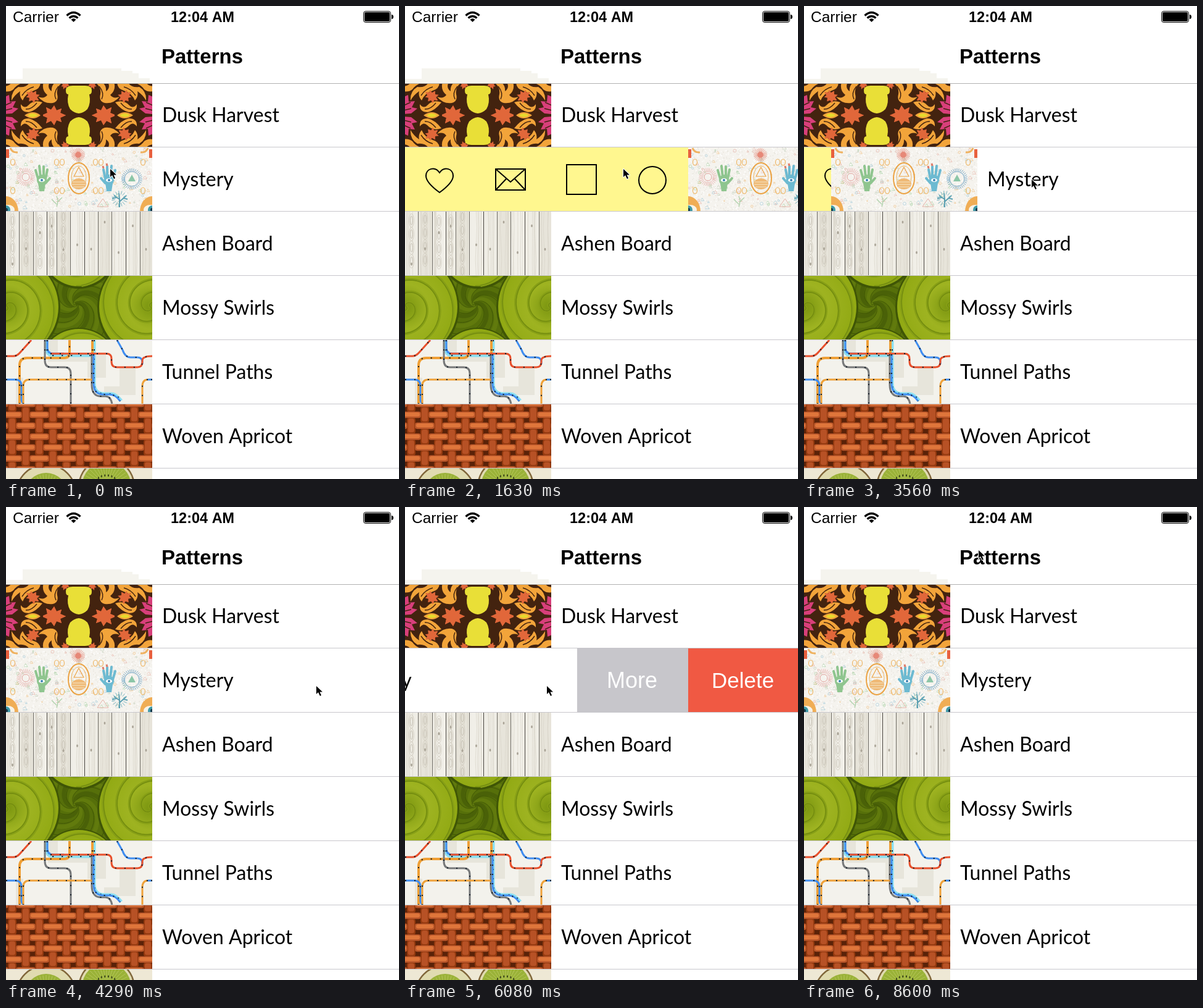
These frames come from a looping animation (637x766 px, 8750 ms). An HTML page with a canvas:

```html
<!DOCTYPE html>
<html lang="en">
<head>
<meta charset="utf-8">
<title>Swipeable list</title>
<style>
  html, body { margin: 0; width: 100%; height: 100%; overflow: hidden; background: #fff; }
  canvas { display: block; }
</style>
</head>
<body>
<canvas id="stage" width="637" height="766"></canvas>
<script>
const LOOP = 8750, TICK = LOOP / 59, ROW = 104, THUMB_W = 237;
const ctx = document.getElementById('stage').getContext('2d');

function seeded(seed) {
  return () => (seed = (seed * 16807) % 2147483647) / 2147483647;
}

function fill(g, color, d) {
  g.fillStyle = color;
  g.fill(new Path2D(d));
}

function line(g, color, width, d) {
  g.strokeStyle = color;
  g.lineWidth = width;
  g.stroke(new Path2D(d));
}

function disc(g, color, x, y, rx, ry = rx) {
  g.fillStyle = color;
  g.beginPath();
  g.ellipse(x, y, rx, ry, 0, 0, 7);
  g.fill();
}

function ring(g, color, width, x, y, rx, ry = rx) {
  g.strokeStyle = color;
  g.lineWidth = width;
  g.beginPath();
  g.ellipse(x, y, rx, ry, 0, 0, 7);
  g.stroke();
}

function rays(g, color, x, y, inner, outer, count) {
  g.strokeStyle = color;
  g.lineWidth = 1;
  g.beginPath();
  for (let i = 0; i < count; i++) {
    const a = i * 2 * Math.PI / count, c = Math.cos(a), s = Math.sin(a);
    g.moveTo(x + inner * c, y + inner * s);
    g.lineTo(x + outer * c, y + outer * s);
  }
  g.stroke();
}

function spiral(g, color, width, x, y, radius, turns, start, power = 1) {
  g.strokeStyle = color;
  g.lineWidth = width;
  g.beginPath();
  for (let u = 0; u <= 1; u += 0.01) {
    const a = start + u * turns * 2 * Math.PI, r = radius * u ** power;
    g.lineTo(x + r * Math.cos(a), y + r * Math.sin(a));
  }
  g.stroke();
}

function thumb(background, paint) {
  const c = document.createElement('canvas');
  c.width = THUMB_W;
  c.height = ROW;
  const g = c.getContext('2d');
  g.fillStyle = background;
  g.fillRect(0, 0, THUMB_W, ROW);
  g.lineJoin = 'round';
  paint(g);
  return c;
}

// Lobed leaf, pointing along +x before the turn.
function leaf(g, x, y, size, turn) {
  g.save();
  g.translate(x, y);
  g.rotate(turn);
  g.scale(size, size);
  fill(g, '#e1673a', 'M-18 -1L-11 -4L-13 -13L-5 -9L0 -16L4 -8L12 -11L10 -4L19 0L10 4L12 11L4 8L0 16L-5 9L-13 13L-11 4L-18 1Z');
  g.restore();
}

// One quarter of the damask, mirrored on both axes.
function autumn(g) {
  for (const sx of [1, -1]) for (const sy of [1, -1]) {
    g.save();
    g.translate(118, 52);
    g.scale(sx, sy);
    fill(g, '#d83f7b', 'M120 -2L108 -3L98 -11L107 -13L102 -23L112 -22L113 -33L120 -30Z');
    line(g, '#43230f', 1.5, 'M120 -8L108 -11M120 -16L109 -21');
    fill(g, '#f2a43a', 'M25 -54Q37 -47 35 -34Q32 -23 42 -20Q56 -18 66 -30Q56 -26 51 -33Q61 -41 57 -54H47Q52 -44 44 -39Q45 -49 37 -54Z');
    fill(g, '#f2a43a', 'M62 -54Q62 -43 73 -40Q86 -36 91 -24Q97 -31 95 -39Q104 -33 109 -24Q110 -39 98 -46Q85 -44 79 -54Z');
    fill(g, '#f2a43a', 'M59 -21Q73 -26 82 -16Q88 -10 94 -18Q95 -5 81 -5Q69 -8 59 -21Z');
    fill(g, '#f2a43a', 'M86 -54Q100 -51 106 -42Q112 -37 120 -39V-47Q111 -48 109 -54Z');
    line(g, '#43230f', 1.5, 'M33 -47Q42 -36 37 -26M73 -46Q85 -43 92 -32M68 -20Q77 -9 86 -10');
    leaf(g, 75, -31, 0.65, -0.6);
    leaf(g, 22, -50, 0.45, 1.2);
    leaf(g, 40, 0, 1, Math.PI);
    fill(g, '#f2a43a', 'M62 0Q74 -10 88 0Z');
    fill(g, '#e8d92e', 'M66 0Q75 -6 83 0Z');
    fill(g, '#e9df37', 'M0 -48H10Q21 -48 21 -40Q21 -34 17 -34Q20 -20 14 -10Q8 -4 0 -3Z');
    g.restore();
  }
}

function hand(g, color, x, flip) {
  g.save();
  g.translate(x, 54);
  g.scale(flip, 1);
  g.lineCap = 'round';
  disc(g, color, 0, -1, 8, 9);
  fill(g, color, 'M-6 4H6L4 17H-4Z');
  line(g, color, 4, 'M-6 -3L-10 -17M-2 -6L-4 -24M3 -5L3 -23M6 -3L9 -18M6 4L13 -4');
  disc(g, '#fff', 0, -1, 5, 3);
  disc(g, '#3b83b1', 0, -1, 2);
  g.restore();
}

function mystic(g) {
  const rnd = seeded(41);
  const inks = ['#a9d3a6', '#f1c182', '#a3cbdb', '#e9b5aa', '#c0cdb9'];
  for (let i = 0; i < 1600; i++) {
    g.fillStyle = i % 2 ? '#e8e5de' : '#fff';
    g.fillRect(rnd() * 237, rnd() * 104, 1.5, 1.5);
  }
  for (let i = 0; i < 130; i++) {
    const x = rnd() * 232, y = rnd() * 100, r = 1 + rnd() * 2.5, ink = inks[i % 5];
    if (i % 3) line(g, ink, 0.7, `M${x} ${y}l${r} ${-r}l${r} ${r * 1.6}h${-r * 2}`);
    else ring(g, ink, 0.7, x, y, r * 0.7);
  }
  for (const x of [11, 82, 91, 145, 154, 222]) for (const y of [24, 70]) ring(g, '#eeb665', 1.2, x, y, 3.5, 5);
  rays(g, '#e79a8b', 117, 12, 5, 11, 24);
  disc(g, '#e68878', 117, 12, 5);
  rays(g, '#e9b5b1', 32, 48, 8, 15, 28);
  ring(g, '#e2a09b', 1, 32, 48, 6);
  rays(g, '#79a9c6', 204, 51, 13, 17, 32);
  ring(g, '#6aa0c2', 1, 204, 51, 12);
  fill(g, '#8cc6a7', 'M204 44L210 55H198Z');
  ring(g, '#eba344', 2, 118, 50, 17, 25);
  ring(g, '#eeb665', 1, 118, 48, 12, 18);
  disc(g, '#efb975', 118, 59, 12, 9);
  line(g, '#f5e7cb', 1, 'M108 56H128M107 60H129M109 64H127');
  line(g, '#eba344', 1.2, 'M118 32L126 47H110Z');
  hand(g, '#8fc58f', 58, 1);
  hand(g, '#6dbad1', 167, -1);
  line(g, '#df7b6a', 3, 'M158 34L157 30M164 30L163 26');
  line(g, '#5a9fb1', 2, 'M184 97V84L175 78M184 88L195 78M184 84L183 74M179 81L172 83M190 82L197 84');
  rays(g, '#79b4c0', 184, 83, 7, 13, 15);
  line(g, '#acd0a8', 1.2, 'M82 96Q86 87 82 79M82 92L74 84M83 89L91 81');
  line(g, '#e5b3a8', 1, 'M148 96L157 83L166 96Z');
  for (const s of [0, 1]) {
    g.save();
    if (s) { g.translate(237, 0); g.scale(-1, 1); }
    disc(g, '#f0ad55', 0, 104, 20, 25);
    disc(g, '#f8f3e8', 3, 101, 11, 8);
    disc(g, '#3f9aa8', 0, 101, 7);
    disc(g, '#18394b', 0, 101, 3);
    fill(g, '#e8603e', 'M0 3H5V17H0Z');
    line(g, '#efb260', 3, 'M7 1Q10 9 19 8');
    g.restore();
  }
}

function boards(g) {
  const rnd = seeded(77), edges = [0, 21, 44, 66, 82, 104, 127, 149, 171, 194, 217, 237];
  for (let i = 0; i < edges.length - 1; i++) {
    const x = edges[i], w = edges[i + 1] - x, mid = x + w / 2;
    g.fillStyle = ['#efede5', '#e7e4da', '#f1efe8'][i % 3];
    g.fillRect(x, 0, w, ROW);
    for (let k = 0; k < 5; k++) {
      const gx = x + 3 + rnd() * (w - 6), bend = rnd() * 5 - 2.5;
      line(g, '#d9d5c9', 0.7, `M${gx} 0Q${gx + bend} 26 ${gx} 52T${gx} 104`);
    }
    if (i < 5) {
      for (let y = 8 + rnd() * 12; y < 100; y += 22) {
        ring(g, '#bdb7a9', 0.8, mid, y, 2, 7);
        ring(g, '#cdc8bb', 0.7, mid, y, 4, 11);
      }
    }
    disc(g, '#aaa497', mid, 15 + rnd() * 70, 1.4, 2.2);
    if (i) {
      g.fillStyle = i % 3 ? '#6d6a63' : '#45413b';
      g.fillRect(x, 0, 1, ROW);
    }
  }
}

function swirls(g) {
  for (let k = 0; k < 8; k++) {
    const a = k * Math.PI / 4;
    spiral(g, k % 2 ? '#4a6108' : '#617a0d', 7, 113, 46, 67, 0.48, a, 1.4);
    spiral(g, '#3f5505', 1, 113, 46, 67, 0.48, a + 0.25, 1.4);
  }
  const wheels = [[118, -43, 60, 1], [118, 150, 64, 2], [2, 50, 83, 0.3], [234, 50, 83, 3.4]];
  for (const [x, y, r, start] of wheels) {
    disc(g, '#3f5506', x, y + 1, r + 3);
    const shade = g.createRadialGradient(x, y, 5, x, y, r);
    shade.addColorStop(0, '#7f9912');
    shade.addColorStop(0.4, '#9eb321');
    shade.addColorStop(1, '#91a913');
    disc(g, shade, x, y, r);
    for (let k = 0; k < 2; k++) {
      spiral(g, '#879f16', 4, x, y, r, 2.1, start + k * Math.PI, 1.15);
      spiral(g, '#718a0f', 1.3, x, y, r, 2.1, start + 0.15 + k * Math.PI, 1.15);
    }
  }
}

function transit(g) {
  fill(g, '#e7e5db', 'M68 0H84V22H162V61H132V35H68ZM184 44H210V89H159V75H184ZM16 61H28V104H16Z');
  const routes = [
    ['#8be0f3', 5, 'M66 0V14Q66 25 77 25H140M143 0V70Q143 87 160 87H171Q178 87 187 98'],
    ['#ef9f35', 4, 'M22 104V41Q22 29 34 29H94Q103 29 103 20V0M140 0V23'],
    ['#3f8df0', 3, 'M0 64H15Q25 64 25 74V96Q25 101 29 104M67 0V12Q67 22 77 22H94M180 0L189 16Q193 28 202 28H213Q221 28 221 36V39M237 64H230'],
    ['#e8502c', 3, 'M0 26H12Q18 26 23 20L41 0M72 22H163Q171 22 171 30V35Q171 44 180 44H213Q221 44 221 35V33Q221 26 237 26'],
    ['#77797a', 3, 'M63 0V33Q63 44 73 44H95Q105 44 105 54V104M139 23V72Q139 91 154 91H161Q170 91 172 104'],
    ['#3f8df0', 3, 'M142 23V70Q142 88 158 88H167Q178 88 185 99'],
    ['#efa23a', 3, 'M28 104V74Q28 64 38 64H139M230 64Q221 64 221 75V104']
  ];
  for (const [color, width, d] of routes) {
    line(g, color, width, d);
    g.setLineDash([2, 13]);
    line(g, '#17202a', 2, d);
    g.setLineDash([]);
  }
}

function weave(g) {
  const strand = (x, y, w, h, dark, light) => {
    g.fillStyle = dark;
    g.beginPath();
    g.roundRect(x - w / 2, y - h / 2, w, h, 4);
    g.fill();
    g.fillStyle = light;
    g.beginPath();
    g.roundRect(x - w / 2 + 2, y - h / 2 + 1.5, w - 4, h - 4, 3);
    g.fill();
  };
  for (const across of [false, true]) {
    for (let j = -1; j < 7; j++) for (let i = -1; i < 12; i++) {
      const x = 10 + i * 22, y = 17 + j * 17.7;
      if (((i + j) % 2 === 0) !== across) continue;
      if (across) strand(x, y, 32, 10.5, '#b9562a', '#df763b');
      else strand(x, y, 14, 26, '#93390f', '#b75125');
    }
  }
}

function kiwi(g) {
  for (const [x, y, r, rind] of [[65, 42, 50, 15], [163, 29, 46, 6]]) {
    disc(g, '#80663a', x, y, r);
    disc(g, '#e0dbb0', x, y, r - 2.5);
    disc(g, '#9ab238', x, y, r - rind);
    rays(g, '#b6c65a', x, y, 9, r - rind - 2, 40);
    disc(g, '#d8dda4', x, y, 15, 12);
    for (let i = 0; i < 22; i++) disc(g, '#39421b', x + 20 * Math.cos(i * 0.286), y + 18 * Math.sin(i * 0.286), 1, 2);
  }
}

const rows = [
  ['Dusk Harvest', thumb('#43230f', autumn)],
  ['Mystery', thumb('#f5f3ee', mystic)],
  ['Ashen Board', thumb('#eeebe3', boards)],
  ['Mossy Swirls', thumb('#566f0a', swirls)],
  ['Tunnel Paths', thumb('#f3f2ec', transit)],
  ['Woven Apricot', thumb('#5a2208', weave)],
  ['', thumb('#eee8d5', kiwi)]
];

// Keys are [tick, ...values].
const slide = [
  [3, 0], [4, 110], [5, 237], [6, 350], [7, 408], [8, 438], [9, 451], [10, 457], [11, 459],
  [21, 459], [22, 410], [23, 240], [24, 44], [25, 16], [26, 5], [27, 0],
  [30, 0], [31, -280], [32, -358], [44, -358], [45, -190], [46, -40], [47, 0]
];
const pointer = [
  [3, 169, 264], [4, 290, 264], [5, 354, 264], [16, 354, 264], [19, 541, 283], [21, 541, 283],
  [24, 369, 281], [26, 369, 281], [29, 503, 290], [30, 503, 290], [32, 330, 290], [34, 330, 290],
  [37, 285, 289], [40, 285, 289], [41, 230, 290], [43, 195, 285], [53, 195, 285], [58, 283, 70]
];

function sample(keys, tick) {
  const next = keys.findIndex(k => k[0] >= tick);
  if (next === 0) return keys[0].slice(1);
  if (next < 0) return keys[keys.length - 1].slice(1);
  const a = keys[next - 1], b = keys[next], u = (tick - a[0]) / (b[0] - a[0]);
  return a.slice(1).map((v, i) => v + (b[i + 1] - v) * u);
}

function text(str, x, y, font, color = '#000') {
  ctx.font = font;
  ctx.fillStyle = color;
  ctx.fillText(str, x, y);
}

function box(color, x, y, w, h) {
  ctx.fillStyle = color;
  ctx.fillRect(x, y, w, h);
}

const sans = '"Liberation Sans", Arial, sans-serif';

function header() {
  fill(ctx, '#f5f4ee', 'M0 118H27V101H187V105H205V109H215V117H233V125H0Z');
  text('Carrier', 11, 26, `24.5px ${sans}`);
  text('12:04 AM', 267, 26, `bold 23.5px ${sans}`);
  text('Patterns', 252, 93, `bold 33px ${sans}`);
  line(ctx, '#000', 3.3, 'M98.5 15.5Q109.5 5.5 120.5 15.5M102.5 19.5Q109.5 13.5 116.5 19.5');
  fill(ctx, '#000', 'M105.5 22Q109.5 18.5 113.5 22L109.5 26Z');
  ctx.strokeStyle = '#000';
  ctx.lineWidth = 1;
  ctx.beginPath();
  ctx.roundRect(579.5, 8.5, 44, 18, 3.5);
  ctx.stroke();
  ctx.fillStyle = '#000';
  ctx.beginPath();
  ctx.roundRect(581, 10, 41, 15, 2);
  ctx.fill();
  fill(ctx, '#000', 'M625 14Q628 14 628 17.5Q628 21 625 21Z');
}

function leftActions(y) {
  box('#fff78f', 0, y, 459, ROW);
  line(ctx, '#000', 2, 'M56 302Q34 286 34 275C34 263 49 259 56 270C63 259 78 263 78 275Q78 286 56 302Z');
  line(ctx, '#000', 2, 'M147 264H195V298H147ZM147 264L171 285L195 264M147 298L164 280M195 298L178 280');
  line(ctx, '#000', 2, 'M262 257H310V305H262Z');
  ring(ctx, '#000', 2, 401, 282, 22);
}

function rightActions(y) {
  box('#c7c6cb', 279, y, 180, ROW);
  box('#f05943', 459, y, 178, ROW);
  text('More', 327, 293, `36px ${sans}`, '#fff');
  text('Delete', 497, 293, `35px ${sans}`, '#fff');
}

function list(shift) {
  rows.forEach(([name, image], i) => {
    const y = 125 + i * ROW, x = i === 1 ? Math.round(shift) : 0;
    if (x > 0) leftActions(y);
    if (x < 0) rightActions(y);
    box('#fff', x, y, 637, ROW);
    ctx.drawImage(image, x, y);
    text(name, x + 253, y + 63, '32px Lato, sans-serif');
  });
  for (let i = 1; i < 7; i++) box('#c8c7cc', 0, 124 + i * ROW, 637, 1);
  box('#b2b2b2', 0, 125, 637, 1);
}

function cursor(x, y) {
  ctx.save();
  ctx.translate(Math.round(x) - 1, Math.round(y) - 1);
  const arrow = 'M1 1V14L4 11L7 17L9 16L6.5 10.5H11Z';
  ctx.lineJoin = 'round';
  line(ctx, '#fff', 2, arrow);
  fill(ctx, '#000', arrow);
  ctx.restore();
}

function draw(time) {
  const tick = Math.floor((time % LOOP) / TICK + 0.1) % 59;
  box('#fff', 0, 0, 637, 766);
  header();
  list(sample(slide, tick)[0]);
  cursor(...sample(pointer, tick));
}

const start = performance.now();
function loop() {
  draw(performance.now() - start);
  requestAnimationFrame(loop);
}
loop();
</script>
</body>
</html>
```
